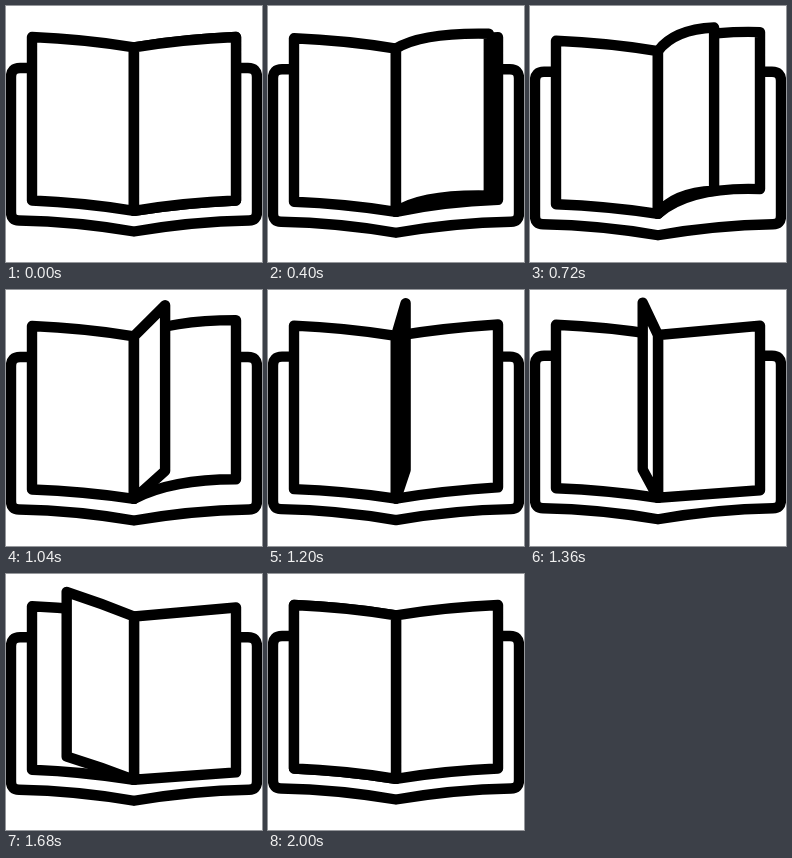
An HTML page for the animation above (2240 ms loop, 256x256 px).

```html
<!DOCTYPE html>
<html lang="en">
<head>
<meta charset="utf-8">
<title>Book</title>
<style>
  html, body { margin: 0; height: 100%; overflow: hidden; background: #fff; }
  svg { display: block; width: 100vw; height: 100vh; }
</style>
</head>
<body>
<svg viewBox="0 0 256 256" fill="#fff" stroke="#000" stroke-width="10.4" stroke-linecap="round" stroke-linejoin="round">
  <path id="cover" d="M22 62H14Q5 62 5 71V206Q5 214.5 13 214.5Q70 215.5 128 225.5Q186 215.5 243 214.5Q251 214.5 251 206V71Q251 62 242 62H234"/>
  <path id="left"/>
  <path id="right"/>
  <path id="flip"/>
</svg>
<script>
const LOOP = 2240, STEP = 80, STEPS = 24;
const SPINE = 128, WIDTH = 102, TOP = 31, BOTTOM = 194.5, SLOPE = 10.3;
const { sin, PI, floor, min, max, exp } = Math;
const el = id => document.getElementById(id);

// Horizontal reach of the turning page, right (1) to left (-1), evenly spaced in time
const reachKeys = [1, .91, .55, .305, -.15, -.66, -1];

// Catmull-Rom through the keys, q from 0 to 1
function reachAt(q) {
  const last = reachKeys.length - 1, p = q * last;
  const i = min(floor(p), last - 1), t = p - i;
  const [a, b, c, d] = [-1, 0, 1, 2].map(k => reachKeys[max(0, min(last, i + k))]);
  return b + t / 2 * (c - a + t * (2 * a - 5 * b + 4 * c - d + t * (3 * (b - c) + d - a)));
}

// u places the bend along the page, v between edge height (0) and spine height (1)
function drawPage(id, drop, reach, topLift, bottomLift, u = .5, v = .2) {
  const x = SPINE + WIDTH * reach, cx = SPINE + WIDTH * reach * u;
  const spineTop = TOP + SLOPE + drop, spineBottom = BOTTOM + SLOPE + drop * .8;
  const top = TOP + drop - topLift, bottom = BOTTOM + drop - bottomLift;
  const bend = (edge, spine) => edge + (spine - edge) * v;
  el(id).setAttribute('d',
    `M${SPINE} ${spineTop}Q${cx} ${bend(top, spineTop)} ${x} ${top}` +
    `V${bottom}Q${cx} ${bend(bottom, spineBottom)} ${SPINE} ${spineBottom}Z`);
}

function draw(time) {
  const tick = floor(time % LOOP / STEP);
  const q = tick < 3 ? 0 : min(1, (tick - 1) / STEPS);
  const drop = 5 * sin(PI * q) ** 2;
  const reach = reachAt(q);

  // The turning page curls at first, then stays stiff until it lies flat
  const swing = sin(2 * PI * q), curl = max(0, swing), sag = max(0, -swing);
  const rise = max(0, sin(PI * q ** 1.6)), flat = reach ** 4;
  // The page below is pulled up for a moment as the other leaves it
  const pull = exp(-(((q - .39) / .15) ** 2));

  el('cover').setAttribute('transform', `translate(0 ${drop})`);
  drawPage('left', drop, -1, 0, 0);
  drawPage('right', drop, 1, 10 * pull - 1.5 * sag, 17.5 * pull - 3 * sag,
    .5 - .22 * pull, .2 - .35 * pull + .35 * sag);
  drawPage('flip', drop, reach, drop + 18.3 * rise, drop + 15 * rise ** .65,
    .5 - .25 * curl, .5 - .3 * flat - .45 * curl);
}

const start = performance.now();
function loop() {
  draw(performance.now() - start);
  requestAnimationFrame(loop);
}
loop();
</script>
</body>
</html>
```
